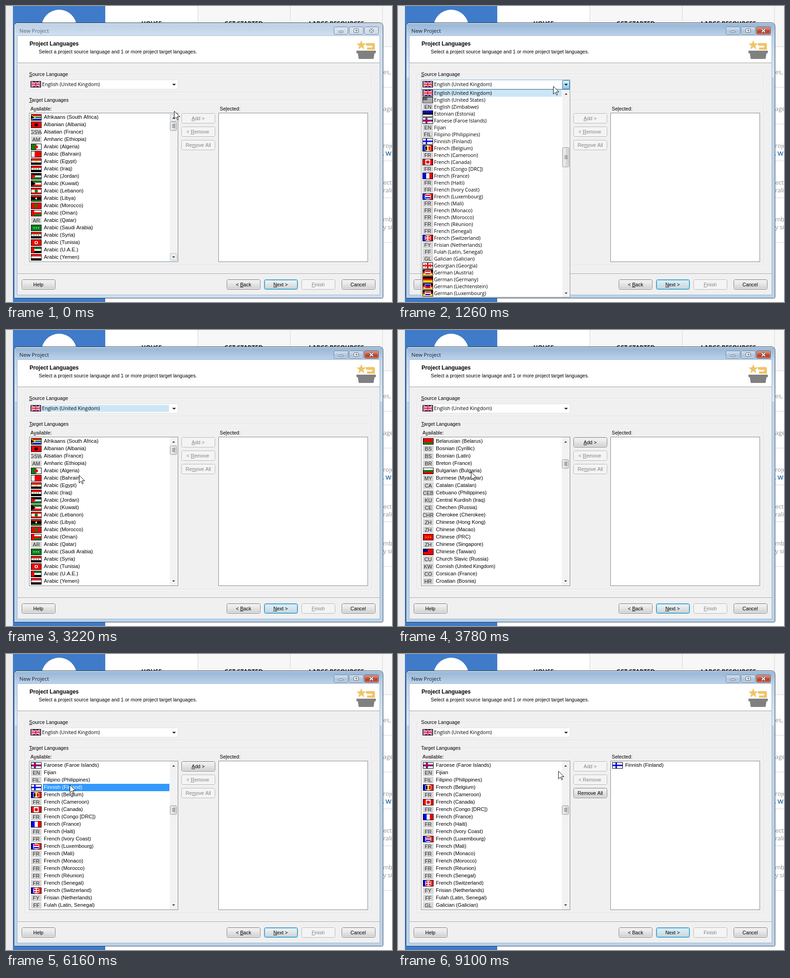
An HTML page with a canvas that plays this animation: 836 by 643 pixels, repeating every 9.24 s.

```html
<!DOCTYPE html>
<html lang="en">
<head>
<meta charset="utf-8">
<title>New Project</title>
<style>
html, body { margin: 0; width: 100%; height: 100%; overflow: hidden; background: #fff; }
canvas { display: block; }
</style>
</head>
<body>
<canvas id="stage" width="836" height="643"></canvas>
<script>
const c = document.getElementById('stage').getContext('2d');
const LOOP = 9240, STEP = 140;
const UI = '10.7px "Liberation Sans", Arial, sans-serif';
const LIST = '11.2px "Liberation Sans", Arial, sans-serif';
const COMBO = '500 10.7px "Open Sans", sans-serif';
const COLORS = { r: '#f00000', w: '#fff', k: '#000', g: '#008018', b: '#0000f0', y: '#ffe800', n: '#000080', o: '#ff9000', s: '#5c5c70' };

// Each entry: name, then a two or three letter code or a flag recipe.
const LANGS = `Afrikaans (South Africa)|Hrrwggwbb Uy uk
Albanian (Albania)|Hr Dk
Alsatian (France)|GSW
Amharic (Ethiopia)|AM
Arabic (Algeria)|Vgw Dr
Arabic (Bahrain)|Vwrr
Arabic (Egypt)|Hrwk dy
Arabic (Iraq)|Hrwk Sg
Arabic (Jordan)|Hkwg Ur
Arabic (Kuwait)|Hgwr Uk
Arabic (Lebanon)|Hrwwr Dg
Arabic (Libya)|Hrkkg dw
Arabic (Morocco)|Hr Dg
Arabic (Oman)|Hwrg Lr
Arabic (Qatar)|AR
Arabic (Saudi Arabia)|Hg Sw
Arabic (Syria)|Hrwk Sg
Arabic (Tunisia)|Hr Dw dr
Arabic (U.A.E.)|Hgwk Lr
Arabic (Yemen)|Hrwk
Armenian (Armenia)|Hrbo
Assamese (India)|AS
Azerbaijani (Cyrillic)|AZ
Azerbaijani (Latin)|Hbrg
Bangla (Bangladesh)|Hg Dr
Bangla (India)|BN
Bashkir (Russia)|BA
Basque (Basque)|EU
Belarusian (Belarus)|Hrrg
Bosnian (Cyrillic)|BS
Bosnian (Latin)|BS
Breton (France)|BR
Bulgarian (Bulgaria)|Hwgr
Burmese (Myanmar)|MY
Catalan (Catalan)|CA
Cebuano (Philippines)|CEB
Central Kurdish (Iraq)|KU
Chechen (Russia)|CE
Cherokee (Cherokee)|CHR
Chinese (Hong Kong)|ZH
Chinese (Macao)|ZH
Chinese (PRC)|Hr Sy
Chinese (Singapore)|ZH
Chinese (Taiwan)|Hr Kn
Church Slavic (Russia)|CU
Cornish (United Kingdom)|KW
Corsican (France)|CO
Croatian (Bosnia)|HR
Croatian (Croatia)|Hrwb
Czech (Czech Republic)|Hwr Ub
Danish (Denmark)|Hr Cw
Dari (Afghanistan)|PRS
Divehi (Maldives)|DV
Dogri (India)|DOI
Dutch (Belgium)|Vkyr
Dutch (Netherlands)|Hrwb
English (Australia)|Hn j Sw
English (Belize)|Hn Dw dn
English (Canada)|J>Vrwr Dr
English (Caribbean)|EN
English (Hong Kong)|EN
English (India)|EN
English (Ireland)|J>Vgwo
English (Jamaica)|Hgkkg Xy
English (Malaysia)|EN
English (New Zealand)|Hn j Sr
English (Republic of the Philippines)|EN
English (Singapore)|EN
English (South Africa)|J>Hrgb Uk
English (Trinidad and Tobago)|Hr Zk
English (United Kingdom)|J
English (United States)|Hswswswsw Ks
English (Zimbabwe)|EN
Estonian (Estonia)|Hbkw
Faroese (Faroe Islands)|Hw Cbr
Fijian|EN
Filipino (Philippines)|FIL
Finnish (Finland)|Hw Cb
French (Belgium)|Vbwr>Vkyr
French (Cameroon)|FR
French (Canada)|Vrwwr Dr
French (Congo [DRC])|FR
French (France)|Vbwr
French (Haiti)|FR
French (Ivory Coast)|FR
French (Luxembourg)|Vbwr>Hrwb
French (Mali)|FR
French (Monaco)|FR
French (Morocco)|FR
French (Réunion)|FR
French (Senegal)|FR
French (Switzerland)|Vbwr>Hr Pw
Frisian (Netherlands)|FY
Fulah (Latin, Senegal)|FF
Galician (Galician)|GL
Georgian (Georgia)|Hw Pr Qr
German (Austria)|Hkry>Hrwr
German (Germany)|Hkry
German (Liechtenstein)|Hkry>Hbr
German (Luxembourg)|Hkry>Hrwb`.split('\n').map(s => s.split('|'));
const UK = 70, FINNISH = 77;

// Pointer keys: step, x, y
const PATH = [[0, 364, 228], [4, 366, 168], [6, 366, 168], [9, 336, 174], [15, 216, 188], [17, 216, 188],
  [23, 158, 315], [24, 158, 315], [31, 158, 298], [36, 158, 298], [42, 138, 284], [44, 138, 284],
  [50, 405, 240], [59, 405, 240], [65, 347, 254]];
const CLICKS = [5, 16, 24, 31, 42, 51];
let showKeys = true;

const rect = (x, y, w, h, color) => { c.fillStyle = color; c.fillRect(x, y, w, h); };
const frame = (x, y, w, h, color) => { c.strokeStyle = color; c.lineWidth = 1; c.strokeRect(x + .5, y + .5, w - 1, h - 1); };

function poly(points, color, stroke) {
  c.beginPath();
  points.forEach(([x, y]) => c.lineTo(x, y));
  c.closePath();
  c.fillStyle = color;
  c.fill();
  if (stroke) { c.strokeStyle = stroke; c.lineWidth = 1; c.stroke(); }
}

function disc(x, y, r, color) {
  c.beginPath();
  c.arc(x, y, r, 0, 7);
  c.fillStyle = color;
  c.fill();
}

function line(x1, y1, x2, y2, color, width) {
  c.beginPath();
  c.moveTo(x1, y1);
  c.lineTo(x2, y2);
  c.strokeStyle = color;
  c.lineWidth = width;
  c.stroke();
}

function shade(y, h, ...stops) {
  const g = c.createLinearGradient(0, y, 0, y + h);
  stops.forEach((s, i) => g.addColorStop(i / (stops.length - 1), s));
  return g;
}

function box(x, y, w, h, r, fill, stroke) {
  c.beginPath();
  c.roundRect(x + .5, y + .5, w - 1, h - 1, r);
  if (fill) { c.fillStyle = fill; c.fill(); }
  if (stroke) { c.strokeStyle = stroke; c.lineWidth = 1; c.stroke(); }
}

// "&" marks the underlined access key.
function text(s, x, y, font = UI, color = '#000', centre = false) {
  const key = s.indexOf('&'), t = s.replace('&', '');
  c.font = font;
  const width = u => c.measureText(u).width;
  if (centre) x = Math.round(x - width(t) / 2);
  c.fillStyle = color;
  c.fillText(t, x, y);
  if (key >= 0 && showKeys) rect(Math.round(x + width(t.slice(0, key))), y + 1, Math.round(width(t[key])), 1, color);
}

function saltire(w, h, color, width) {
  line(0, 0, w, h, color, width);
  line(0, h, w, 0, color, width);
}

function plus(x, w, h, color, width) {
  line(x, 0, x, h, color, width);
  line(0, h / 2, w, h / 2, color, width);
}

function jack(w, h) {
  rect(0, 0, w, h, '#0000b0');
  saltire(w, h, '#fff', h / 4);
  saltire(w, h, COLORS.r, h / 12);
  plus(w / 2, w, h, '#fff', h / 3);
  plus(w / 2, w, h, COLORS.r, h / 6);
}

const triangle = (w, h, color) => poly([[0, h * (.5 - w)], [w * 21, h / 2], [0, h * (.5 + w)]], color);

const PARTS = {
  H: (w, h, k) => k.forEach((p, i) => rect(0, i * h / k.length, w, h / k.length + .3, p)),
  V: (w, h, k) => k.forEach((p, i) => rect(i * w / k.length, 0, w / k.length + .3, h, p)),
  U: (w, h, [p]) => triangle(.45, h, p),
  u: (w, h, [p]) => triangle(.32, h, p),
  L: (w, h, [p]) => rect(0, 0, w * .3, h, p),
  K: (w, h, [p]) => rect(0, 0, w * .45, h * .5, p),
  D: (w, h, [p]) => disc(w / 2, h / 2, h * .3, p),
  d: (w, h, [p]) => disc(w / 2, h / 2, h * .16, p),
  S: (w, h, [p]) => [.27, .5, .73].forEach(u => rect(w * u - 1, h / 2 - 1, 2, 2, p)),
  Q: (w, h, [p]) => [.25, .75].forEach(u => [.25, .75].forEach(v => rect(w * u - 1, h * v - 1, 2, 2, p))),
  C: (w, h, [p, q]) => { plus(w * .36, w, h, p, q ? 4 : 3); if (q) plus(w * .36, w, h, q, 2); },
  P: (w, h, [p]) => plus(w / 2, w, h, p, h / 4),
  X: (w, h, [p]) => saltire(w, h, p, 2),
  Z: (w, h, [p]) => { line(0, 0, w, h, '#fff', 6); line(0, 0, w, h, p, 4); },
  J: jack,
  j: (w, h) => jack(w / 2, h / 2)
};

function flag(spec, x, y, w = 23, h = 14, edge = '#000') {
  const code = /^[A-Z]{2,3}$/.test(spec), [base, inner] = spec.split('>');
  c.save();
  c.beginPath();
  c.rect(x, y, w, h);
  c.clip();
  if (code) {
    rect(x, y, w, h, '#d6d6d6');
    text(spec, x + w / 2, y + 11, LIST, '#222', true);
  } else {
    rect(x, y, w, h, edge);
    c.translate(x + 1, y + 1);
    c.beginPath();
    c.rect(0, 0, w - 2, h - 2);
    c.clip();
    for (const part of base.split(' ')) PARTS[part[0]](w - 2, h - 2, [...part.slice(1)].map(k => COLORS[k]));
  }
  c.restore();
  if (inner) flag(inner, x + 5, y + 2, w - 10, h - 4, '#fff');
}

const arrow = (x, y, dir, size = 3) => poly([[x - size, y - dir * size / 2], [x + size, y - dir * size / 2], [x, y + dir * size / 2]], '#222');

function thumb(x, y, w, h) {
  box(x, y, w, h, 2, '#e9e9e9', '#959595');
  rect(x + w / 2, y + 2, w / 2 - 2, h - 4, '#d4d4d4');
  for (let i = 0; i < 3; i++) rect(x + w / 2 - 3, Math.round(y + h / 2) - 4 + i * 3, 7, 1, '#555');
}

function button(s, x, y, state = 'on', glow = 0) {
  const off = state === 'off', hot = state === 'hot';
  const fill = off ? '#f4f4f4' : hot ? shade(y, 22, '#eaf6fd', '#d9f0fc', '#bee6fd', '#a7d9f5')
    : shade(y, 22, '#f3f3f3', '#ebebeb', '#dcdcdc', '#cfcfcf');
  box(x, y, 73, 22, 3, fill, off ? '#adb2b5' : hot || glow ? '#3c7fb1' : '#707070');
  if (glow) box(x + 1, y + 1, 71, 20, 2, `rgba(175,225,250,${glow})`, '#45cdf5');
  else box(x + 1, y + 1, 71, 20, 2, null, '#fcfcfc');
  text(s, x + 36, y + 15, UI, off ? '#838383' : '#000', true);
}

function page() {
  rect(0, 0, 836, 643, '#fff');
  rect(0, 0, 15, 643, '#ececec');
  rect(15, 0, 200, 643, '#3f7bc8');
  disc(115, 46, 38, '#fff');
  rect(416, 0, 420, 88, '#f7f7f7');
  [415, 615, 815].forEach(x => rect(x, 0, 1, 88, '#d6d6d6'));
  [88, 176, 256, 336, 416, 513].forEach(y => rect(815, y, 21, 1, '#d6d6d6'));
  const nav = 'bold 13px "Open Sans", sans-serif', body = '13px "Open Sans", sans-serif';
  [['HOUSE', 315], ['GET STARTED', 515], ['LARGE RESOURCES', 716]].forEach(([s, x]) => text(s, x, 42, nav, '#222', true));
  [['es,', 148], ['ages', 228], ['roje', 308], ['ects', 388], ['raliz', 405], ['mb', 468], ['y sir', 485]]
    .forEach(([s, y]) => text(s, 817, y, body, '#8a8f94'));
  text('. W', 815, 325, nav, '#3f7bb8');
}

function icon() {
  const star = [];
  for (let i = 0; i < 10; i++) {
    const a = i * Math.PI / 5, r = i % 2 ? 4.6 : 11;
    star.push([769.5 + r * Math.sin(a), 85 - r * Math.cos(a)]);
  }
  poly(star, '#efc469');
  box(779, 80, 20, 7, 2, '#efc469');
  rect(782, 90, 17, 5, '#efc469');
  rect(793, 82, 6, 13, '#efc469');
  poly([[759, 97], [801, 97], [801, 102], [798, 103], [796, 115], [764, 115], [762, 103], [759, 102]], '#808080');
}

function chrome(active) {
  box(17, 36, 800, 599, [7, 7, 2, 2], active ? '#b9d1ea' : '#ccdcee', '#22303f');
  box(18, 37, 798, 597, [6, 6, 1, 1], null, active ? '#d6ecfa' : '#e4eef8');
  rect(19, 39, 796, 26, active ? shade(39, 26, '#98b6d6', '#aac4e1', '#bcd2ea') : shade(39, 26, '#bfd1e6', '#c6d7ea', '#d3e1f1'));
  if (active) [19, 809].forEach(x => rect(x, 65, 6, 90, shade(65, 90, '#bcd2ea', '#d8e7f5')));
  text('New Project', 29, 58, '11.5px "Open Sans", sans-serif', active ? '#16212c' : '#596979');
  [710, 743, 776].forEach((x, i) => {
    const red = active && i === 2;
    box(x, 45, 31, 17, 2, red ? shade(45, 17, '#e0a190', '#cf6a50', '#b83a1e', '#d2704e')
      : active ? shade(45, 17, '#d3e2f1', '#bed2e7', '#a9c2dd', '#c3d8ec') : shade(45, 17, '#dbe6f2', '#cbdaeb'), red ? '#5b2a25' : '#66788e');
    box(x + 1, 46, 29, 15, 1, null, 'rgba(255,255,255,.5)');
  });
  box(720, 54, 11, 4, 1, '#fff', '#4a5563');
  box(753, 49, 11, 9, 1, '#fff', '#4a5563');
  frame(757, 52, 4, 3, '#4a5563');
  [['#4a4f5a', 4.2], ['#fff', 2.2]].forEach(([k, w]) => {
    line(788, 50, 795, 57, k, w);
    line(788, 57, 795, 50, k, w);
  });
  rect(24, 64, 786, 564, '#a9bdd2');
  rect(25, 65, 784, 562, '#f0f0f0');
  rect(25, 65, 784, 58, '#fff');
  rect(25, 123, 784, 1, '#a0a0a0');
  text('Project Languages', 51, 86, 'bold 11.9px "Liberation Sans", Arial, sans-serif');
  text('Select a project source language and 1 or more project target languages.', 71, 103, '10.6px "Liberation Sans", Arial, sans-serif');
  icon();
  rect(25, 581, 784, 1, '#a0a0a0');
  rect(25, 582, 784, 1, '#fff');
}

function group(s, y, h, width) {
  box(42, y + 1, 752, h, 3, null, '#fff');
  box(41, y, 752, h, 3, null, '#dcdcdc');
  rect(48, y - 4, width, 9, '#f0f0f0');
  text(s, 50, y + 4);
}

function combo(lit, focused) {
  rect(50, 160, 323, 21, '#fff');
  frame(50, 160, 323, 21, lit ? '#7ab0d8' : '#e3e3e3');
  if (focused) rect(77, 163, 276, 15, '#cce6f6');
  flag('J', 53, 163);
  text(LANGS[UK][0], 78, 174, COMBO);
  if (lit) box(356, 161, 16, 20, 1, shade(161, 20, '#dff2fc', '#b2def5', '#7fc2e8'), '#2c628b');
  arrow(364, 171, 1, 4);
}

function available(top, selected, grey, gone, hover) {
  rect(50, 232, 323, 324, '#fff');
  rect(355, 233, 17, 322, '#f2f2f2');
  if (hover) [235, 537].forEach(y => box(355, y, 16, 16, 2, '#e6ecf0', '#bcc4c8'));
  arrow(363, 243, -1);
  arrow(363, 545.5, 1);
  thumb(355, 251 + Math.round(top * 1.054), 15, 20);
  const shown = gone ? LANGS.filter((_, i) => i !== FINNISH) : LANGS;
  for (let i = 0; i < 20; i++) {
    const [name, spec] = shown[top + i], y = 234 + i * 16, on = top + i === selected;
    if (on) rect(80, y, 274, 16, grey ? '#d8d8d8' : '#3399ff');
    flag(spec, 54, y + 1);
    text(name, 82, y + 11, LIST, on && !grey ? '#fff' : '#000');
  }
  frame(50, 232, 323, 324, '#828790');
}

function chosen(gone) {
  rect(460, 232, 324, 324, '#fff');
  frame(460, 232, 324, 324, '#828790');
  if (!gone) return;
  const [name, spec] = LANGS[FINNISH];
  flag(spec, 464, 235);
  text(name, 492, 245, LIST);
}

function dropdown() {
  rect(50, 181, 323, 452, '#fff');
  rect(356, 182, 16, 450, '#f2f2f2');
  rect(77, 182, 278, 15, '#cce6f6');
  for (let i = 0; i < 30; i++) {
    const [name, spec] = LANGS[UK + i], y = 181 + i * 15;
    flag(spec, 53, y + 1);
    text(name, 78, y + 12, COMBO);
  }
  arrow(364, 191, -1);
  arrow(364, 624, 1);
  thumb(356, 307, 15, 43);
  frame(50, 181, 323, 452, '#8a9298');
}

const clamp = u => Math.max(0, Math.min(1, u));
const ease = u => u * u * (3 - 2 * u);

function pointer(n) {
  const i = Math.max(1, PATH.findIndex(p => p[0] >= n)), [a, x, y] = PATH[i - 1], [b, p, q] = PATH[i];
  const u = ease(clamp((n - a) / (b - a)));
  return [Math.round(x + (p - x) * u), Math.round(y + (q - y) * u)];
}

function drawPointer(n) {
  const [x, y] = pointer(n);
  if (CLICKS.includes(n)) {
    c.beginPath();
    c.arc(x - 5, y - 4.5, 11, 0, 7);
    c.strokeStyle = '#ffee00';
    c.lineWidth = 3;
    c.stroke();
  }
  const shape = [[0, 0], [0, 17], [4, 13], [7, 19], [9, 18], [6.5, 12], [12, 12]];
  poly(shape.map(([p, q]) => [x + .5 + p, y + .5 + q]), '#fff', '#111');
}

function draw(n) {
  const open = n >= 6 && n < 17, gone = n >= 52;
  const selected = n < 24 || gone ? -1 : n < 31 ? 5 : n < 42 ? 59 : FINNISH;
  const top = Math.round(55 * ease(clamp((n - 24) / 6))) + Math.round(19 * ease(clamp((n - 36) / 5)));
  const pulse = .2 - .15 * Math.cos(n * STEP * Math.PI / 1000);
  showKeys = !gone;

  page();
  chrome(n >= 5);
  group('&Source Language', 148, 40, 89);
  group('&Target Languages', 204, 360, 92);
  text('A&vailable:', 53, 227);
  text('Se&lected:', 463, 227);
  combo(open || n === 4 || n === 5, n >= 17 && n < 24);
  available(top, selected, n === 51, gone, n < 2);
  chosen(gone);
  button('&Add >', 380, 233, selected < 0 ? 'off' : n >= 49 ? 'hot' : 'on');
  button('< &Remove', 380, 262, 'off');
  button('Re&move All', 380, 291, gone ? 'on' : 'off');
  button('Help', 34, 594);
  button('< &Back', 478, 594);
  button('&Next >', 559, 594, 'on', pulse);
  button('&Finish', 640, 594, 'off');
  button('Cancel', 727, 594);
  if (open) dropdown();
  drawPointer(n);
}

function tick() {
  let n = Math.floor(performance.now() % LOOP / STEP);
  // Two pauses in which the whole picture rests.
  if (n === 35) n = 34;
  if (n > 55 && n < 60) n = 55;
  draw(n);
  requestAnimationFrame(tick);
}
tick();
</script>
</body>
</html>
```
